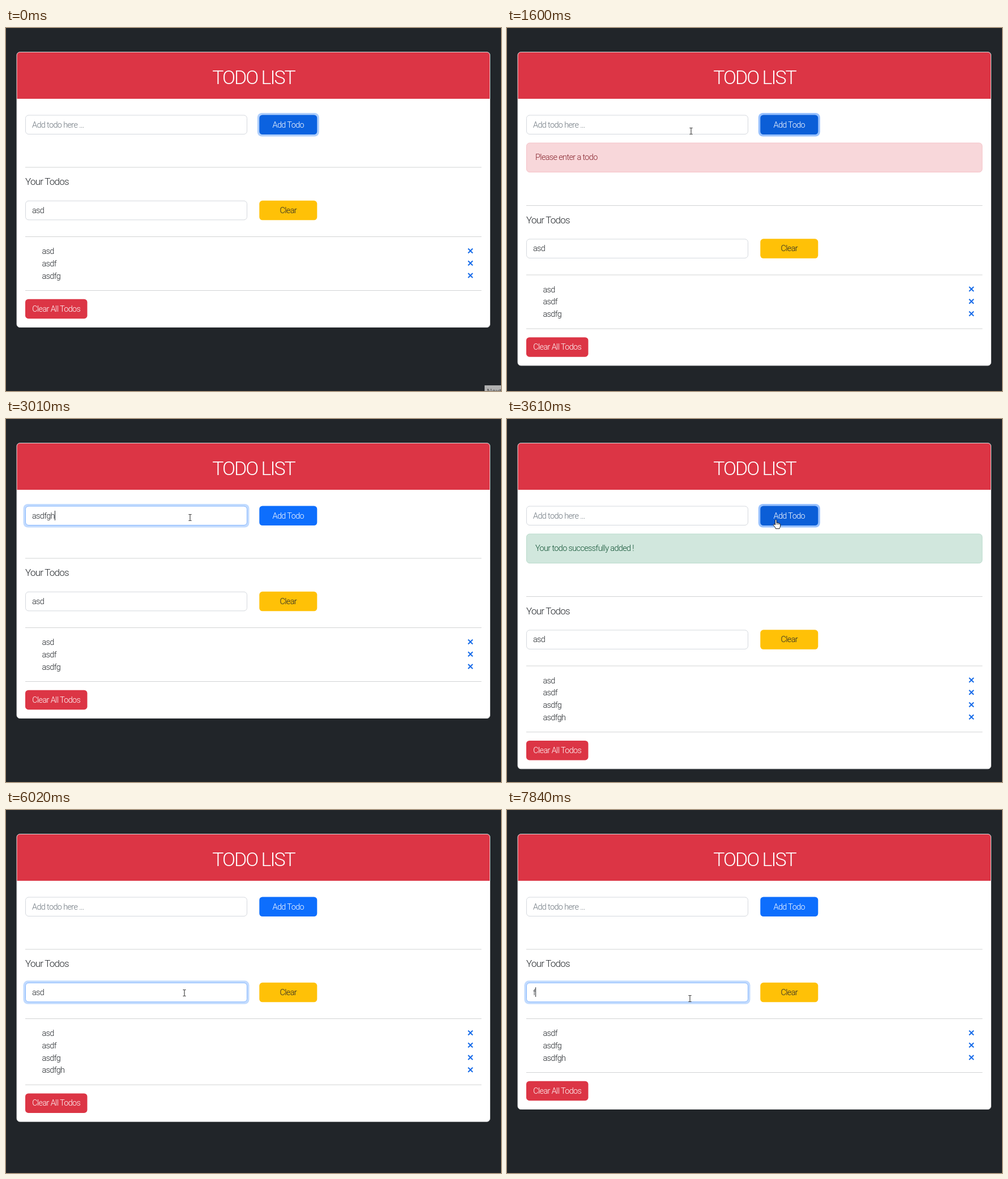
These frames come from a looping animation (874 by 641 pixels, 8000 ms). An HTML page:

```html
<!DOCTYPE html>
<html lang="en">
<head>
<meta charset="utf-8">
<title>Todo list</title>
<style>
  html, body { margin: 0; width: 100%; height: 100%; overflow: hidden; background: #212529; }
  svg { display: block; width: 874px; height: 641px; }
  text { font: 300 14.5px Roboto, sans-serif; letter-spacing: -0.045em; fill: #212529; white-space: pre; }
  .title { font-size: 34px; letter-spacing: -0.06em; fill: #fff; }
  .heading { font-size: 17px; }
  .light { fill: #fff; }
  .placeholder { fill: #6c757d; }
  .suggestion { font: 600 12px "Open Sans", sans-serif; letter-spacing: 0; fill: #fff; }
  .tooltip { font: 12px "Open Sans", sans-serif; letter-spacing: 0; fill: #444; }
  .middle { text-anchor: middle; }
</style>
</head>
<body>
<svg id="stage" viewBox="0 0 874 641"></svg>
<script>
const LOOP = 8000;
const ALERT_SHIFT = 67.5;
const ROW = 21.75;
const stage = document.getElementById('stage');

const initial = {
  button: 'warming', focus: '', caret: false, alert: '', cursor: null, tooltip: true,
  todo: '', filter: 'asd', suggestions: [], items: ['asd', 'asdf', 'asdfg']
};

// Each entry changes part of the state from its time onwards.
const changes = [
  [200, { button: 'focus', tooltip: false, cursor: ['arrow', 790, 585] }],
  [400, { cursor: ['arrow', 640, 430] }],
  [600, { cursor: ['arrow', 515, 270] }],
  [800, { cursor: ['hand', 457, 182] }],
  [1000, { alert: 'error' }],
  [1400, { cursor: ['beam', 345, 185] }],
  [1600, { cursor: ['beam', 325, 182] }],
  [2000, { alert: '' }],
  [2200, { button: 'idle', focus: 'todo', caret: true, cursor: ['beam', 325, 174] }],
  [2400, { suggestions: ['asd', 'dd'] }],
  [2600, { todo: 'as', suggestions: ['asd'] }],
  [2800, { todo: 'asdf', suggestions: [] }],
  [3010, { todo: 'asdfgh' }],
  [3220, { button: 'hover', cursor: ['hand', 475, 178] }],
  [3410, { button: 'focus', focus: '', caret: false }],
  [3610, { alert: 'success', todo: '', items: ['asd', 'asdf', 'asdfg', 'asdfgh'] }],
  [4610, { alert: '' }],
  [5010, { cursor: ['arrow', 425, 235] }],
  [5210, { cursor: ['arrow', 350, 288] }],
  [5410, { cursor: ['beam', 315, 323] }],
  [5610, { button: 'idle', focus: 'filter', caret: true }],
  [6020, { caret: false }],
  [6220, { caret: true }],
  [6420, { filter: 'as' }],
  [6620, { filter: 'a', cursor: ['beam', 323, 333] }],
  [6820, { filter: '' }],
  [7440, { filter: 'f' }]
];

const buttonStyles = {
  idle: ['#0d6efd', ''],
  hover: ['#0b5ed7', ''],
  focus: ['#0b5ed7', '#98c1fe'],
  warming: ['#0b62e0', '#b0cffb']
};

const alerts = {
  error: ['Please enter a todo', '#f8d7da', '#f5c2c7', '#842029'],
  success: ['Your todo successfully added !', '#d1e7dd', '#badbcc', '#0f5132']
};

const cursors = {
  arrow: '<path d="M0 0V15L3.5 11.8L6 17L8.2 16L5.8 11H10.5Z" fill="#fff" stroke="#000" stroke-width=".9"/>',
  beam: '<path d="M-2.5 -5.5H-.5L0 -5L.5 -5.5H2.5M0 -5V5M-2.5 5.5H-.5L0 5L.5 5.5H2.5" fill="none" stroke="#222"/>',
  hand: `<path d="M-1.6 9V.8C-1.6 -.8 1 -.8 1 .8V5.5C1.5 4.5 3.3 4.8 3.4 6C4.2 5.2 5.6 5.6 5.7 6.8
    C6.7 6.2 7.7 7 7.7 8V11C7.7 13 6.3 13.5 6.2 15.7H-.7C-.8 13.5 -3 11.8 -4.5 9.5C-5.1 8 -3.5 7.4 -2.7 8.2Z"
    fill="#fff" stroke="#000" stroke-width=".9"/><path d="M1 5.5V9M3.4 6V9M5.7 6.8V9" stroke="#000" stroke-width=".6"/>`
};

const rect = (x, y, w, h, fill, stroke = 'none', r = 5.5) =>
  `<rect x="${x}" y="${y}" width="${w}" height="${h}" rx="${r}" fill="${fill}" stroke="${stroke}"/>`;
const text = (x, y, content, cls = '', extra = '') =>
  `<text x="${x}" y="${y}" class="${cls}" ${extra}>${content}</text>`;
const rule = y => `<path d="M34 ${y}H839.5" stroke="#d2d3d4" stroke-width="1.2"/>`;
const ring = (x, y, w, h, color) => rect(x - 3.5, y - 3.5, w + 7, h + 7, color, 'none', 8);

function button(x, y, w, label, fill, cls, halo) {
  return (halo ? ring(x, y, w, 34.5, halo) : '') + rect(x, y, w, 34.5, fill) +
    text(x + w / 2, y + 22, label, 'middle ' + cls);
}

function field(y, value, placeholder, focused) {
  return (focused ? ring(34, y, 392, 34.5, '#c2dbfe') : '') +
    rect(34.5, y + .5, 391, 33.5, '#fff', focused ? '#86b7fe' : '#d5d9de') +
    text(46, y + 22, value || placeholder, value ? '' : 'placeholder', focused ? 'id="typed"' : '');
}

function alertBox(kind) {
  const [message, fill, border, color] = alerts[kind];
  return rect(34.5, 203, 804.5, 51.5, fill, border) +
    text(50, 233, message, '', `style="fill:${color}"`);
}

function todoRow(label, i) {
  const y = 393.5 + i * ROW;
  return text(63.5, y + 5.5, label) +
    `<path d="M816 ${y - 4}l8 8m0 -8l-8 8" stroke="#1068e8" stroke-width="1.9"/>`;
}

function suggestionList(labels) {
  return rect(34, 188.5, 392, 16 + labels.length * 32.3, '#292a2d', '#202124', 1) +
    labels.map((label, i) => text(43, 216 + i * 32.5, label, 'suggestion')).join('');
}

function render(s) {
  const rows = s.items.filter(item => item.includes(s.filter));
  const shift = s.alert ? ALERT_SHIFT : 0;
  const end = (rows.length - 3) * ROW;
  const [blue, halo] = buttonStyles[s.button];

  stage.innerHTML =
    rect(19, 42.5, 835.5, 486 + shift + end, '#fff', '#d8d9da') +
    '<path d="M19.5 125V48.5Q19.5 43 25 43H848.5Q854 43 854 48.5V125Z" fill="#dc3545"/>' +
    text(437, 99, 'TODO LIST', 'title middle') +
    field(153.5, s.todo, 'Add todo here ...', s.focus === 'todo') +
    button(447.3, 153.5, 102, 'Add Todo', blue, 'light', halo) +
    (s.alert ? alertBox(s.alert) : '') +
    `<g transform="translate(0 ${shift})">` +
      rule(246) +
      text(34, 277, 'Your Todos', 'heading') +
      field(304.8, s.filter, '', s.focus === 'filter') +
      button(447.3, 304.8, 102, 'Clear', '#ffc107', '') +
      rule(368.5) +
      rows.map(todoRow).join('') +
      rule(463.5 + end) +
      button(34, 478.7 + end, 109.5, 'Clear All Todos', '#dc3545', 'light') +
    '</g>' +
    (s.suggestions.length ? suggestionList(s.suggestions) : '') +
    (s.tooltip ? rect(845, 631, 40, 20, '#b0b0b0', 'none', 0) + text(849, 646, 'Next', 'tooltip') : '');

  if (s.caret) {
    const value = s[s.focus];
    const typed = document.getElementById('typed');
    const x = 46.5 + (value ? typed.getComputedTextLength() : 0);
    const y = s.focus === 'todo' ? 162 : 313;
    stage.innerHTML += `<path d="M${x} ${y}v17" stroke="#212529"/>`;
  }
  if (s.cursor) {
    const [kind, x, y] = s.cursor;
    stage.innerHTML += `<g transform="translate(${x} ${y})">${cursors[kind]}</g>`;
  }
}

const start = performance.now();
let shown = -1;

function tick() {
  const time = (performance.now() - start) % LOOP;
  const past = changes.filter(([at]) => at <= time);
  if (past.length !== shown) {
    shown = past.length;
    render(Object.assign({}, initial, ...past.map(([, patch]) => patch)));
  }
  requestAnimationFrame(tick);
}
tick();
</script>
</body>
</html>
```
